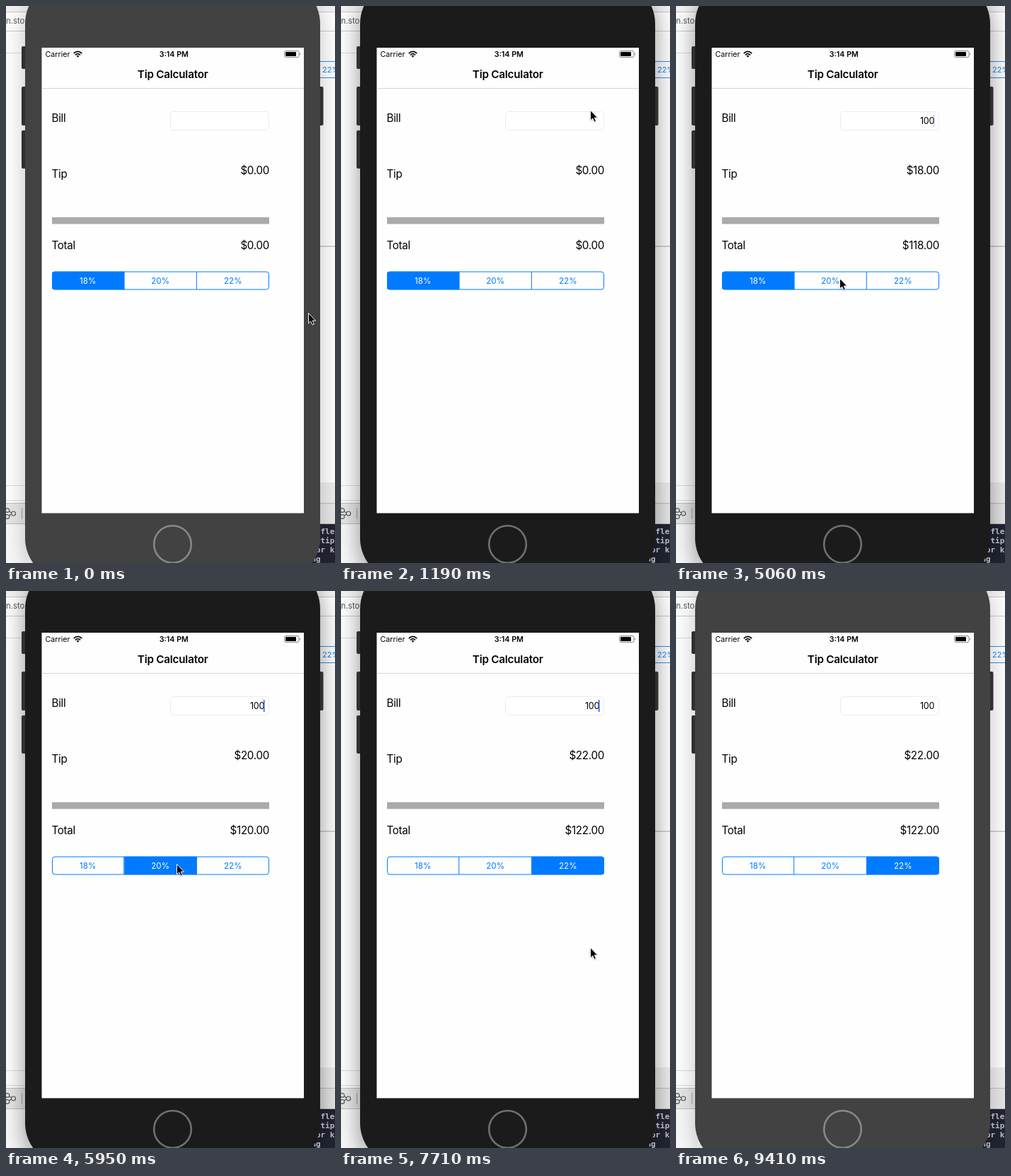
Animation of 465x788 px, one loop 9.51 s. Source, as an HTML page:

```html
<!DOCTYPE html>
<html lang="en">
<head>
<meta charset="utf-8">
<title>Tip Calculator</title>
<style>
  html, body { margin: 0; width: 100%; height: 100%; overflow: hidden; background: #fff; }
  svg { display: block; width: 465px; height: 788px; font-family: Inter, Roboto, sans-serif; }
  .label { font-size: 15.2px; letter-spacing: -.3px; }
  .status { font-size: 10.7px; }
  .mid { text-anchor: middle; }
  .end { text-anchor: end; }
  .semi { font-weight: 600; }
  .seg text { font-size: 11.6px; text-anchor: middle; }
  .term { font: bold 11px "DejaVu Sans Mono", monospace; fill: #b9bbc9; }
  #body { fill: #424242; }
  #home { stroke: #888; }
  #shadow { opacity: .2; }
  .active #body { fill: #1b1b1b; }
  .active #home { stroke: #707070; }
  .active #shadow { opacity: .38; }
</style>
</head>
<body>
<svg id="stage" viewBox="0 0 465 788">
  <defs>
    <filter id="blur" x="-20%" y="-20%" width="140%" height="140%"><feGaussianBlur stdDeviation="15"/></filter>
    <filter id="soft" x="-50%" y="-50%" width="200%" height="200%"><feGaussianBlur stdDeviation=".8"/></filter>
    <clipPath id="segClip"><rect x="65" y="375.5" width="306.8" height="26" rx="3.5"/></clipPath>
  </defs>

  <!-- desktop behind the phone -->
  <rect width="465" height="788" fill="#fdfdfd"/>
  <rect width="465" height="8" fill="#f1f1f1"/>
  <path d="M0 8.5H465M0 35.5H465" stroke="#c9c9c9"/>
  <path d="M0 66.5H30M0 678.5H30M0 699.5H30" stroke="#d9d9d9"/>
  <path d="M440 340H465" stroke="#a5a5a5"/>
  <rect x="440" y="674" width="25" height="29" fill="#ececec"/>
  <rect y="703" width="465" height="30" fill="#e6e6e6"/>
  <path d="M0 703.5H465M0 732.5H465" stroke="#bdbdbd"/>
  <rect y="733" width="30" height="55" fill="#f7f7f7"/>
  <path d="M440 78.5H465M440 101.5H465" stroke="#2f8bf5"/>
  <text x="447" y="94" font-size="11" fill="#1f82f5">22%</text>
  <text x="0" y="25" font-size="11.3" fill="#555">n.sto</text>
  <g fill="none" stroke="#555" stroke-width="1.2">
    <circle cx="2" cy="713.5" r="2.8"/><circle cx="2" cy="722.5" r="2.8"/><circle cx="10.5" cy="718" r="3"/>
    <path d="M4.5 715L7.5 717M4.5 721L7.5 719"/>
    <path d="M22.5 710V726" stroke="#aaa"/>
  </g>
  <rect x="400" y="733" width="65" height="55" fill="#232433"/>

  <rect id="shadow" x="25" y="-28" width="421" height="850" rx="60" filter="url(#blur)"/>
  <g class="term">
    <text x="444.5" y="747">fle</text>
    <text x="444.5" y="760">tip</text>
    <text x="438" y="773">or k</text>
    <text x="431.5" y="786">ng</text>
  </g>

  <!-- phone -->
  <g fill="#303030">
    <rect x="22" y="57" width="8" height="32" rx="2"/>
    <rect x="22" y="114" width="8" height="55" rx="2"/>
    <rect x="22" y="176" width="8" height="54" rx="2"/>
    <rect x="440" y="114" width="8.5" height="55" rx="2"/>
  </g>
  <rect id="body" x="27" y="-35" width="417" height="848" rx="60"/>
  <circle id="home" cx="235.5" cy="761.5" r="26.3" fill="none" stroke-width="2.6"/>
  <rect x="50.5" y="59" width="370.5" height="658.5" fill="#fefefe"/>

  <text class="status" x="55.5" y="72">Carrier</text>
  <g fill="none" stroke="#000" stroke-width="1.7">
    <path d="M95.8 67Q101.5 61.8 107.2 67M98 69.3Q101.5 66.1 105 69.3"/>
    <path d="M99.6 70.5Q101.5 68.9 103.4 70.5L101.5 72.8Z" fill="#000" stroke="none"/>
  </g>
  <text class="status semi mid" x="237.3" y="72">3:14 PM</text>
  <rect x="393.5" y="63.5" width="20.5" height="9" rx="2" fill="none" stroke="#777" stroke-width=".9"/>
  <rect x="395" y="65" width="15" height="6" rx=".7"/>
  <path d="M415 66.5Q417 68 415 69.5Z" fill="#777"/>
  <text class="mid semi" x="235.7" y="102" font-size="15.2" letter-spacing="-.2">Tip Calculator</text>
  <path d="M50.5 116.5H421" stroke="#d4d4d4"/>

  <text class="label" x="64.5" y="164">Bill</text>
  <text class="label" x="64.5" y="243">Tip</text>
  <text class="label" x="64.5" y="344">Total</text>
  <rect x="232.5" y="149.5" width="139" height="26" rx="4.5" fill="#fff" stroke="#ececec"/>
  <text id="bill" class="end" x="365" y="167" font-size="12.5" letter-spacing="-.3"></text>
  <rect id="caret" x="363.8" y="154" width="1.8" height="17" fill="#4668e8"/>
  <text id="tip" class="label end" x="372" y="238"></text>
  <text id="total" class="label end" x="372" y="344"></text>
  <rect x="65" y="298.8" width="307" height="9.6" fill="#aaa"/>

  <g class="seg">
    <g clip-path="url(#segClip)"><rect id="pick" x="65" y="375.5" width="102.5" height="26" fill="#007aff"/></g>
    <rect x="65.5" y="376" width="306" height="25" rx="3.5" fill="none" stroke="#007aff"/>
    <path d="M166.7 376V401M269.3 376V401" stroke="#007aff"/>
    <text x="115.7" y="393">18%</text>
    <text x="218.2" y="393">20%</text>
    <text x="320.8" y="393">22%</text>
  </g>

  <g id="cursor">
    <path d="M0 1V16L3.5 13L6 18L8.5 17L6.3 12H11Z" opacity=".35" filter="url(#soft)"/>
    <path d="M.5 .5V15L3.7 12L6.1 17.2L8.5 16.1L6.2 11.1H10.6Z" stroke="#fff" stroke-linejoin="round"/>
  </g>
</svg>

<script>
const LOOP = 9510, TICK = 148.3;
const WAKE = 1190, SLEEP = 9410, FOCUS = 1630, BLINK = 1025;
const keyTimes = [2830, 3280, 3580];
const pickTimes = [5510, 6980];

// the pointer glides from one rest point to the next, bending towards "via"
const glides = [
  { from: 0, till: 890, via: [288, 190], to: [352, 147] },
  { from: 1340, till: 1630, to: [352, 164] },
  { from: 3870, till: 4760, to: [231, 385] },
  { from: 5800, till: 6240, via: [249, 386], to: [323, 397] },
  { from: 7270, till: 8450, via: [366, 560], to: [430, 769] },
  { from: 8450, till: 8750, to: [434, 800] }
];

const $ = id => document.getElementById(id);
const segTexts = document.querySelectorAll('.seg text');
const clamp = v => Math.min(1, Math.max(0, v));
const smooth = u => u * u * (3 - 2 * u);
const passed = (times, t) => times.filter(e => e <= t).length;
const money = v => '$' + v.toFixed(2);

function pointer(t) {
  let pos = [427, 434];
  for (const { from, till, via, to } of glides) {
    if (t < from) break;
    const u = smooth(clamp((t - from) / (till - from)));
    pos = pos.map((a, i) => {
      const b = to[i], c = via ? via[i] : (a + b) / 2;
      return (1 - u) ** 2 * a + 2 * u * (1 - u) * c + u * u * b;
    });
  }
  return pos.map(Math.round);
}

// blinking starts afresh with every key press
function caretLevel(t) {
  if (t < FOCUS) return 0;
  const since = t - Math.max(FOCUS, ...keyTimes.filter(k => k <= t));
  return clamp(.5 - 1.2 * Math.cos(2 * Math.PI * (since - 670) / BLINK));
}

function draw() {
  const t = performance.now() % LOOP;
  const held = Math.floor((t + 10) / TICK) * TICK;
  const bill = '100'.slice(0, passed(keyTimes, t));
  const choice = passed(pickTimes, t);
  const tip = bill * (18 + 2 * choice) / 100;

  $('stage').classList.toggle('active', t >= WAKE && t < SLEEP);
  $('cursor').setAttribute('transform', `translate(${pointer(held)})`);
  $('caret').setAttribute('opacity', caretLevel(held));
  $('bill').textContent = bill;
  $('tip').textContent = money(tip);
  $('total').textContent = money(+bill + tip);
  $('pick').setAttribute('x', 65 + 102.3 * choice);
  segTexts.forEach((s, i) => s.setAttribute('fill', i === choice ? '#fff' : '#007aff'));
  requestAnimationFrame(draw);
}
draw();
</script>
</body>
</html>
```
